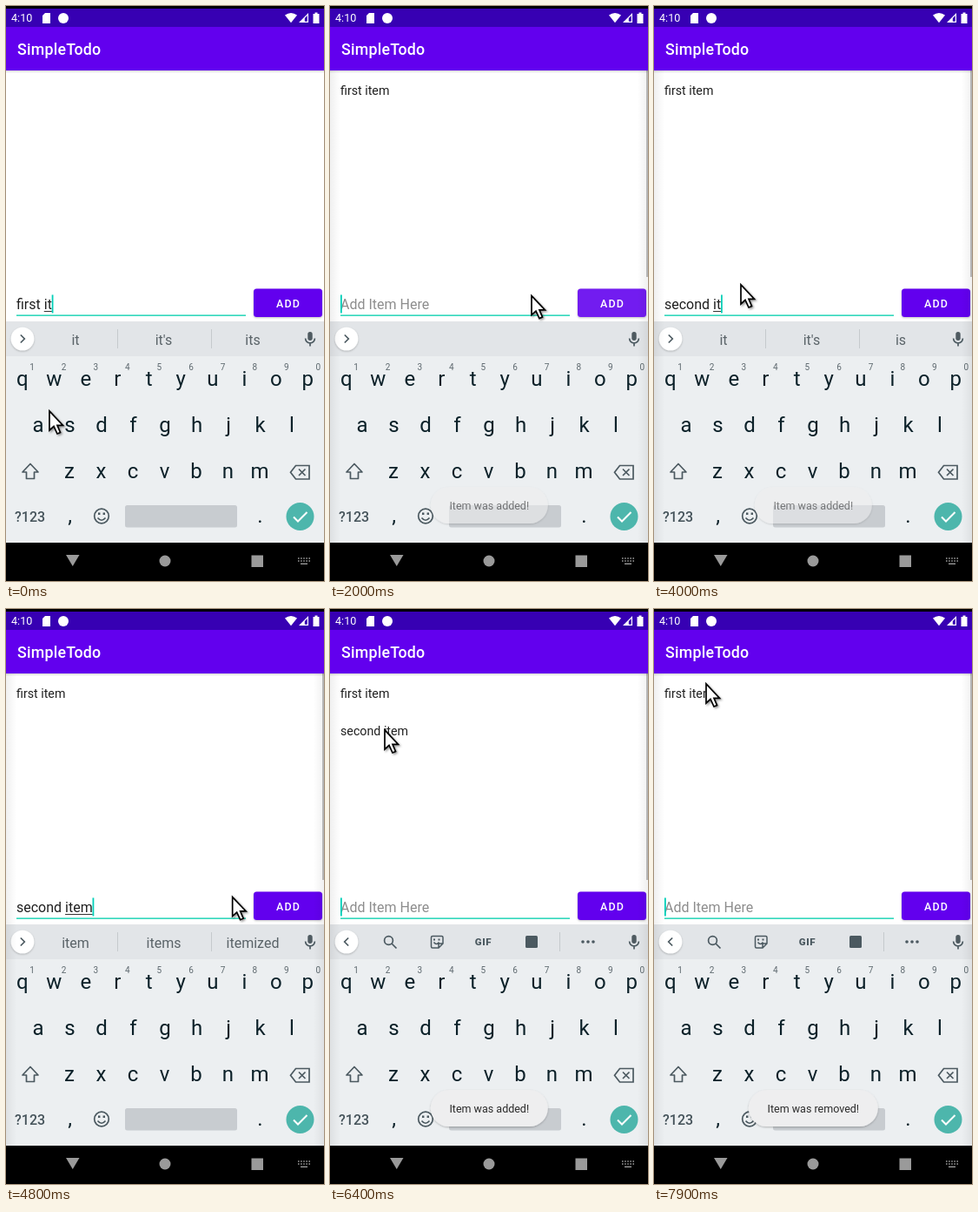
Write an HTML page that moves like this. It is 366 by 660 pixels and loops after 8 s.

```html
<!DOCTYPE html>
<html lang="en">
<head>
<meta charset="utf-8">
<title>SimpleTodo</title>
<style>
html, body { margin: 0; width: 100%; height: 100%; overflow: hidden; background: #000; }
svg { display: block; width: 366px; height: 660px; font-family: Roboto, sans-serif; }
text { white-space: pre; }
.mid { text-anchor: middle; }
.key { font-size: 24px; fill: #0c2129; }
.num { font-size: 10px; fill: #5d686e; }
.sug { font-size: 16px; fill: #5a6368; }
.list { font-size: 14.24px; fill: #202020; }
.icon { fill: none; stroke: #4b5960; stroke-width: 1.7; }
</style>
</head>
<body>
<svg viewBox="0 0 366 660">
  <defs>
    <linearGradient id="edge">
      <stop offset="0" stop-color="#000" stop-opacity=".06"/>
      <stop offset="1" stop-color="#000" stop-opacity="0"/>
    </linearGradient>
    <linearGradient id="drop" x2="0" y2="1">
      <stop offset="0" stop-color="#000" stop-opacity=".16"/>
      <stop offset="1" stop-color="#000" stop-opacity="0"/>
    </linearGradient>
    <filter id="soft" x="-30%" y="-30%" width="160%" height="160%">
      <feDropShadow dx="0" dy="1" stdDeviation="1" flood-opacity=".25"/>
    </filter>
    <filter id="lift" x="-30%" y="-30%" width="170%" height="160%">
      <feDropShadow dx="1.5" dy="1.5" stdDeviation="1.2" flood-opacity=".4"/>
    </filter>
  </defs>

  <rect width="366" height="660" fill="#fff"/>
  <rect width="366" height="24" fill="#3700b3"/>
  <rect width="366" height="3" fill="#000"/>
  <rect y="24" width="366" height="50" fill="#6200ee"/>
  <rect y="74" width="366" height="3" fill="url(#drop)"/>

  <g fill="#fff">
    <text x="6" y="18" font-size="12.6">4:10</text>
    <path d="M45 8h6v12h-9v-9z"/>
    <circle cx="66" cy="14" r="6"/>
    <path d="M321 10.5q7-5 14 0l-7 8.700z"/>
    <path d="M348 8v11h-11zm-1.200 3l-3 3v3.800h3z" fill-rule="evenodd"/>
    <path d="M353.500 9h2v-1.500h3v1.500h2v11h-7z"/>
    <text x="13" y="56" font-size="17.8" font-weight="500" letter-spacing=".22">SimpleTodo</text>
  </g>

  <text id="first" class="list" x="12" y="102">first item</text>
  <text id="second" class="list" x="12" y="145">second item</text>
  <rect id="press" y="119" width="366" height="43" fill="#000" opacity="0"/>
  <rect id="bar" x="364" y="74" width="2" height="237" fill="#000" opacity=".25"/>

  <text id="hint" x="12" y="348" font-size="16" fill="#8d8d8d">Add Item Here</text>
  <text id="field" x="12" y="348" font-size="16" fill="#202020"></text>
  <rect id="under" y="350" height="1" fill="#333"/>
  <rect x="12" y="354.500" width="264" height="1.300" fill="#03cfac"/>
  <rect id="caret" y="331.500" width="1.800" height="21" fill="#03cfb8"/>

  <rect id="button" x="285" y="324.500" width="79" height="32.500" rx="3.500" fill="#6200ee" filter="url(#soft)"/>
  <text class="mid" x="325" y="346" font-size="12.46" font-weight="500" letter-spacing="1.1" fill="#fff">ADD</text>

  <rect y="362" width="366" height="254" fill="#eceff1"/>
  <rect y="362" width="366" height="40" fill="#e2e5e8"/>
  <circle cx="19" cy="382" r="13.300" fill="#fff" filter="url(#soft)"/>
  <path id="chevron" class="icon" d="M-2.200 -4.500L2.300 0L-2.200 4.500"/>
  <g fill="#4f5b61">
    <rect x="347.300" y="374" width="5.400" height="10" rx="2.700"/>
    <path class="icon" d="M344.600 381.500a5.400 5.400 0 0 0 10.800 0M350 387v3.500" stroke-width="1.400"/>
  </g>
  <g id="words">
    <path d="M128.500 371v22M236.500 371v22" stroke="#c5cacd"/>
    <text class="sug mid" x="80" y="388.500"></text>
    <text class="sug mid" x="181.500" y="388.500"></text>
    <text class="sug mid" x="284" y="388.500"></text>
  </g>
  <g id="tools">
    <g class="icon">
      <circle cx="67.500" cy="380.500" r="4.900"/>
      <path d="M71 384l5.500 5.500"/>
      <path d="M118 375.500h10.500q1.500 0 1.500 1.500v7l-5 5h-7q-1.500 0-1.500-1.500v-10.500q0-1.500 1.500-1.500zM130 384h-5v5M119.500 382.500q3 4 6 0" stroke-width="1.500"/>
    </g>
    <g fill="#4b5960">
      <path d="M119 378.500h2v2h-2zm5.500 0h2v2h-2z"/>
      <text class="mid" x="176.500" y="386" font-size="11.500" font-weight="900" letter-spacing=".6">GIF</text>
      <rect x="225" y="375" width="14" height="14" rx="1.500"/>
      <circle cx="291" cy="382" r="1.800"/><circle cx="297" cy="382" r="1.800"/><circle cx="303" cy="382" r="1.800"/>
    </g>
    <path d="M264.500 371v22" stroke="#c5cacd"/>
  </g>

  <g id="keys"></g>
  <g class="icon">
    <path d="M28 525.500l9 9.500h-4.500v7.500h-9v-7.500h-4.500z" stroke-linejoin="round"/>
    <path d="M333.500 527.500h15.500v15.500h-15.500l-6-7.750zM337 531.500l7.500 7.500m0-7.500l-7.500 7.500"/>
    <circle cx="110" cy="585.500" r="8.300"/>
    <path d="M105.500 587.500q4.500 5.500 9 0"/>
  </g>
  <path d="M106 581.500h2.400v2.600h-2.400zm5.600 0h2.400v2.600h-2.400z" fill="#4b5960"/>
  <text x="10" y="591.500" font-size="16" font-weight="500" fill="#46545b">?123</text>
  <rect x="137" y="573" width="129" height="25.500" rx="2.500" fill="#c8ccd0"/>
  <circle cx="338.500" cy="586" r="16" fill="#4db6ac"/>
  <path d="M331 586.500l5 5l10.500-10.500" fill="none" stroke="#fff" stroke-width="2"/>

  <g id="edges">
    <rect y="74" width="12" height="542" fill="url(#edge)"/>
    <rect y="74" width="12" height="542" fill="url(#edge)" transform="matrix(-1 0 0 1 366 0)"/>
  </g>

  <g id="toast">
    <rect y="552" height="42" rx="21" fill="#eeeeef" filter="url(#soft)"/>
    <text class="mid" x="183.300" y="577.500" font-size="12.5" fill="#2b2b2b"></text>
  </g>

  <rect y="616" width="366" height="44" fill="#000"/>
  <g fill="#9a9a9a">
    <path d="M69 630h15.500l-7.750 13z"/>
    <circle cx="183" cy="637" r="6.500"/>
    <rect x="282.500" y="630.500" width="13.500" height="13.500"/>
    <path d="M336 634h14M336 637h14" stroke="#9a9a9a" stroke-width="1.600" stroke-dasharray="1.600 1.500"/>
    <path d="M339 640.300h8" stroke="#9a9a9a" stroke-width="1.400"/>
  </g>

  <path id="mouse" d="M0 0V22L5 17.500L9 26L12.500 24.500L9 16.300H15.500Z" fill="#fff" stroke="#000" stroke-width="1.700" filter="url(#lift)"/>
</svg>
<script>
const LOOP = 8000, STEP = 100;
const $ = id => document.getElementById(id);
const set = (el, attrs) => { for (const k in attrs) el.setAttribute(k, attrs[k]); };

// time, typed text, strip: three words, 'empty' or 'tools'
const typing = [
  [0, 'first it', "it,it's,its"],
  [300, 'first ite', 'ite,item,items'],
  [600, 'first item', 'item,items,itemized'],
  [1800, '', 'empty'],
  [2200, '', 'tools'],
  [2500, 's', 's,so,see'],
  [2600, 'se', 'se,see,send'],
  [2800, 'sec', 'sec,SEC,second'],
  [3000, 'seco', 'seco,second,seconds'],
  [3100, 'secon', 'secon,second,seconds'],
  [3200, 'second', 'second,seconds,secondary'],
  [3400, 'second ', 'time,one,half'],
  [3800, 'second i', 'i,in,is'],
  [3900, 'second it', "it,it's,is"],
  [4100, 'second ite', 'ite,item,items'],
  [4200, 'second item', 'item,items,itemized'],
  [5400, '', 'empty'],
  [5800, '', 'tools']
];

// time, x, y of the pointer tip
const path = [
  [0, 50, 465], [500, 50, 465], [800, 190, 402], [1100, 343, 338], [1300, 320, 341],
  [1800, 320, 341], [2300, 100, 320], [4600, 100, 320], [4900, 341, 336], [5100, 300, 337],
  [5600, 300, 337], [6100, 62, 142], [6400, 63, 139], [7200, 63, 139], [7600, 61, 75],
  [7900, 60, 86], [8000, 60, 86]
];

function ramp(t, points, i = 1) {
  const n = points.findIndex(p => p[0] > t);
  if (n < 0) return points[points.length - 1][i];
  if (n === 0) return points[0][i];
  const a = points[n - 1], b = points[n];
  return a[i] + (b[i] - a[i]) * (t - a[0]) / (b[0] - a[0]);
}

function addKeys() {
  const label = (cls, x, y, s) => `<text class="${cls} mid" x="${x}" y="${y}">${s}</text>`;
  const row = (cls, chars, x, y, gap = 36.5) =>
    [...chars].map((c, i) => label(cls, x + i * gap, y, c)).join('');
  $('keys').innerHTML = row('key', 'qwertyuiop', 18.8, 436) + row('num', '1234567890', 30, 418, 36.6) +
    row('key', 'asdfghjkl', 37, 489) + row('key', 'zxcvbnm', 73, 542) +
    label('key', 73.5, 593, ',') + label('key', 292.5, 593, '.');
}

function drawField(t) {
  const [, text, strip] = typing.filter(e => e[0] <= t).pop();
  const field = $('field'), from = text.lastIndexOf(' ') + 1;
  field.textContent = text;
  const width = n => n ? field.getSubStringLength(0, n) : 0;
  const start = width(from), end = width(text.length);
  set($('under'), { x: 12 + start, width: end - start });
  set($('hint'), { opacity: text ? 0 : 1 });
  const off = (t >= 5800 && t < 6300) || (t >= 6900 && t < 7300);
  const thin = t >= 1300 && t < 1700;
  set($('caret'), { x: 12 + end - (text ? .2 : 0), width: thin ? 1 : 1.8, opacity: off ? 0 : 1 });

  const tools = strip === 'tools', words = strip.split(',');
  set($('tools'), { opacity: tools ? 1 : 0 });
  set($('words'), { opacity: words.length > 1 ? 1 : 0 });
  if (words.length > 1) $('words').querySelectorAll('text').forEach((el, i) => el.textContent = words[i]);
  set($('chevron'), { transform: `translate(19 382) scale(${tools ? -1 : 1} 1)` });
}

function drawList(t) {
  set($('first'), { opacity: ramp(t, [[1800, 0], [1900, .55], [2000, 1]]) });
  set($('second'), { opacity: ramp(t, [[5400, 0], [5500, .55], [5600, 1], [6800, 1], [6900, .5], [7000, 0]]) });
  set($('press'), { opacity: t === 6900 ? .06 : 0 });
  set($('bar'), { opacity: t >= 1800 ? .25 : 0 });
  const lit = Math.max(...[1700, 5300].map(p =>
    ramp(t, [[p - 100, 0], [p, .12], [p + 200, .2], [p + 400, 0]])));
  const mix = c => Math.round(c + (255 - c) * lit);
  set($('button'), { fill: `rgb(${mix(98)},${mix(0)},${mix(238)})` });
}

function drawToast(t) {
  const removed = t >= 7700, half = removed ? 74.5 : 67.5;
  const [box, text] = $('toast').children;
  text.textContent = removed ? 'Item was removed!' : 'Item was added!';
  set(box, { x: 183.3 - half, width: half * 2 });
  set($('toast'), { opacity: ramp(t, [
    [1800, 0], [1900, .15], [2100, 1], [3800, 1], [4000, .55], [4300, 0],
    [5400, 0], [5500, .15], [5700, 1], [7400, 1], [7600, .1], [7700, .3], [7900, 1]
  ]) });
}

function draw(ms) {
  const t = Math.floor(ms % LOOP / STEP) * STEP;
  drawField(t);
  drawList(t);
  drawToast(t);
  set($('edges'), { opacity: t < 300 ? 0 : 1 });
  set($('mouse'), { transform: `translate(${ramp(t, path)} ${ramp(t, path, 2)})` });
}

addKeys();
const begin = performance.now();
function tick() {
  draw(performance.now() - begin);
  requestAnimationFrame(tick);
}
tick();
</script>
</body>
</html>
```
